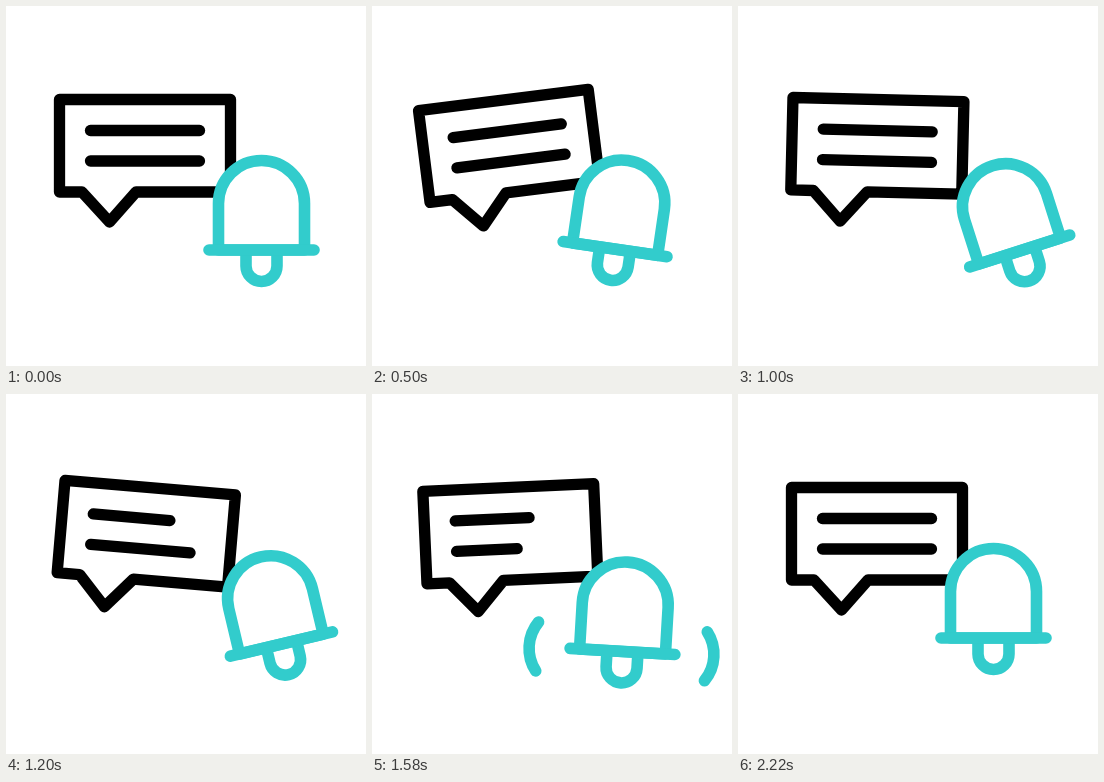
Animation of 360 by 360 pixels, one loop 2.4 s. Source, as an HTML page:

```html
<!DOCTYPE html>
<html lang="en">
<head>
<meta charset="utf-8">
<title>Message alert</title>
<style>
html, body { margin: 0; width: 100%; height: 100%; overflow: hidden; background: #fff; }
svg { display: block; width: 100vw; height: 100vh; }
g { fill: none; stroke-linecap: round; stroke-linejoin: round; }
#bubble { stroke: #000; stroke-width: 11.3; }
#bell { stroke: #32cccc; stroke-width: 11.6; }
.solid { fill: #fff; }
</style>
</head>
<body>
<svg viewBox="0 0 360 360">
  <g id="bubble">
    <path d="M53.5 93.5H224.5V186H130L103.5 216L76 186H53.5Z"/>
    <path id="line1"/>
    <path id="line2"/>
  </g>
  <g id="bell">
    <path class="wave" pathLength="1" d="M170 219.5A41.5 41.5 0 0 0 170 268.5"/>
    <path class="wave" pathLength="1" d="M339 219.5A41.5 41.5 0 0 1 339 268.5"/>
    <path class="solid" d="M240 244V260A15.5 15.5 0 0 0 271 260V244"/>
    <path class="solid" d="M212.5 244V197.5A43 43 0 0 1 298.5 197.5V244Z"/>
    <path d="M203 244H308"/>
  </g>
</svg>
<script>
const LOOP = 2400, START = 220, END = 2220, LINE = 109;
const set = (id, name, value) => document.getElementById(id).setAttribute(name, value);
const waves = document.querySelectorAll('.wave');

// Eased step from 0 to 1 between times a and b.
function rise(t, a, b) {
  const u = Math.min(1, Math.max(0, (t - a) / (b - a)));
  return u * u * (3 - 2 * u);
}

// Eased hump: 0 at a, 1 at top, 0 again at b.
const hump = (t, a, top, b) => rise(t, a, top) - rise(t, top, b);

const bubbleTurn = t =>
  -10.2 * hump(t, START, 660, 1160) + 5 * hump(t, 660, 1160, 1780) - 5 * hump(t, 1160, 1780, END);

const bellTurn = t =>
  13.7 * hump(t, START, 712, 1040) - 19 * hump(t, 712, 1040, 1540) +
  4 * hump(t, 1040, 1540, 1810) - 6.6 * hump(t, 1540, 1810, END);

function draw(now) {
  const t = now % LOOP;
  const drop = 14.7 * hump(t, 480, 1800, END);
  set('bubble', 'transform', `rotate(${bubbleTurn(t)} 139 154.75)`);
  set('bell', 'transform', `translate(0 ${drop}) rotate(${bellTurn(t)} 255.5 158)`);
  set('line1', 'd', `M84.5 124.5h${LINE - 59 * hump(t, 1000, 1380, 1840)}`);
  set('line2', 'd', `M84.5 155h${LINE - 60 * hump(t, 1000, 1810, END)}`);

  // The sound waves open from their middle.
  const open = rise(t, 1340, 1540) - rise(t, 1600, 1740);
  for (const wave of waves) {
    wave.style.display = open > 0.01 ? '' : 'none';
    wave.setAttribute('stroke-dasharray', `${open} 2`);
    wave.setAttribute('stroke-dashoffset', (open - 1) / 2);
  }
  requestAnimationFrame(draw);
}
draw(performance.now());
</script>
</body>
</html>
```
